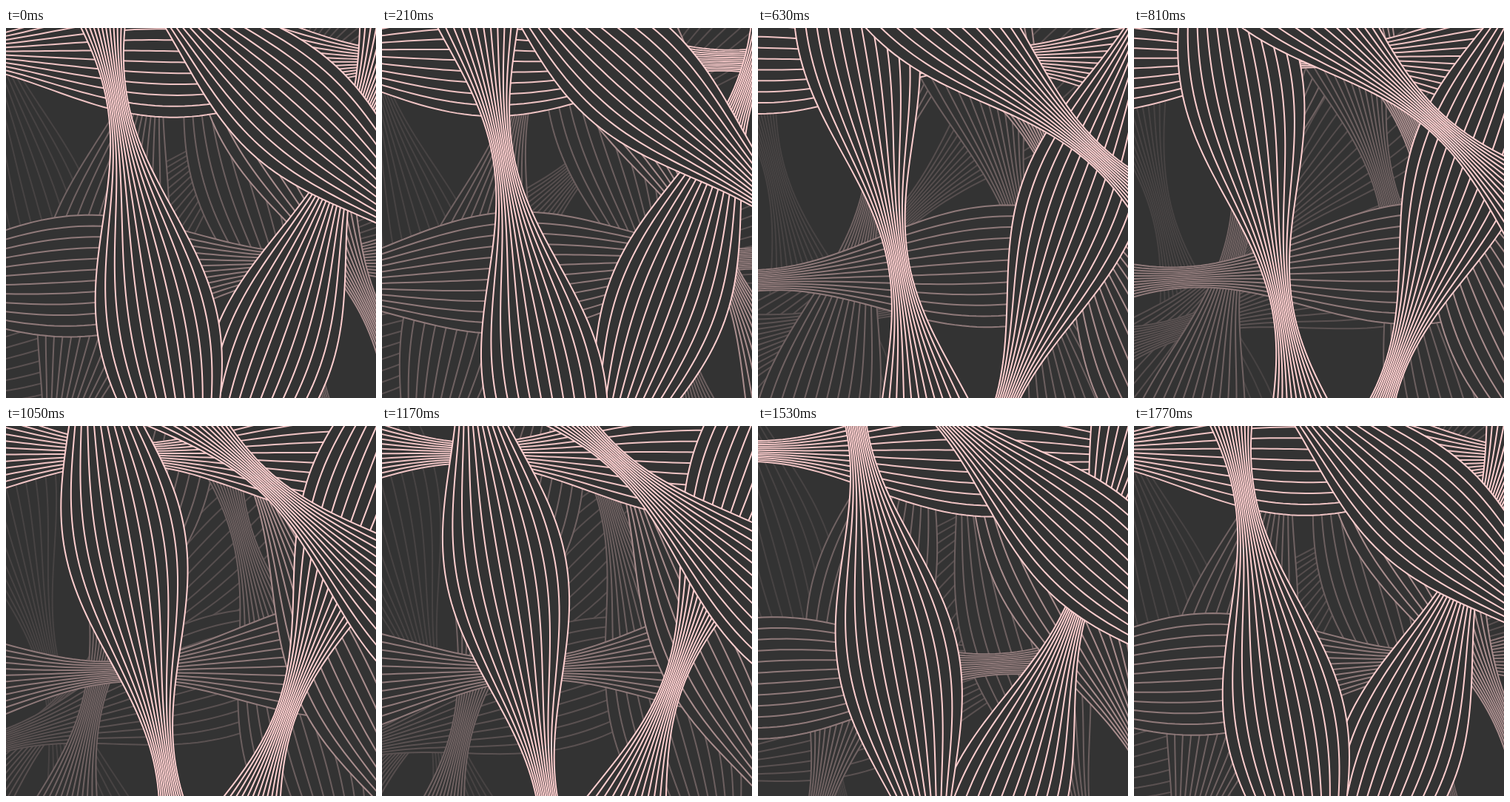
Recreate the animation shown at these times as an HTML page with a canvas. Size 500 by 500 pixels, loop 1800 ms.

```html
<!DOCTYPE html>
<html lang="en">
<head>
<meta charset="utf-8">
<title>Ribbons</title>
<style>
  html, body { margin: 0; width: 100%; height: 100%; overflow: hidden; background: #333; }
  canvas { display: block; }
</style>
</head>
<body>
<canvas id="stage" width="500" height="500"></canvas>
<script>
const ctx = document.getElementById('stage').getContext('2d');

const LOOP = 1800, STEP = 30;
const WAVE = 636;            // distance between two necks
const SPEED = WAVE / 59.5;   // travel per step
const MID = 48, SWELL = 34;  // half width: mean and swing
const STRANDS = 12;
const REACH = 900, GRAIN = 10;
const BACK = [51, 51, 51], PINK = [255, 207, 207];

// Back to front: a neck at time zero, heading in degrees, brightness
const ribbons = [
  { x: -37, y: -28, heading: 74.9, tone: 0.10 },
  { x: 343, y: 112, heading: 135, tone: 0.17 },
  { x: 342, y: 322, heading: 163.3, tone: 0.19 },
  { x: 208, y: 10, heading: 104, tone: 0.30 },
  { x: 421, y: 497, heading: 253.8, tone: 0.28 },
  { x: -218, y: 354, heading: -3.4, tone: 0.45 },
  { x: 496, y: 389, heading: 244.3, tone: 0.58 },
  { x: -97, y: 32, heading: 181.2, tone: 0.92 },
  { x: 469, y: 142, heading: -69.8, tone: 1 },
  { x: 150, y: 97, heading: 79.8, tone: 1 },
  { x: 625, y: 323, heading: 222, tone: 1 }
];

const shade = tone =>
  `rgb(${BACK.map((c, i) => Math.round(c + (PINK[i] - c) * tone)).join(',')})`;

function halfWidth(s, shift) {
  return MID - SWELL * Math.cos((s - shift) * 2 * Math.PI / WAVE);
}

// One strand along the ribbon; side runs from -1 to 1
function trace(side, shift, reverse) {
  for (let d = -REACH; d <= REACH; d += GRAIN) {
    const s = reverse ? -d : d;
    ctx.lineTo(s, side * halfWidth(s, shift));
  }
}

function drawRibbon({ x, y, heading, tone }, shift) {
  ctx.save();
  ctx.translate(x, y);
  ctx.rotate(heading * Math.PI / 180);

  ctx.beginPath();
  trace(-1, shift, false);
  trace(1, shift, true);
  ctx.fillStyle = shade(0);
  ctx.fill();

  ctx.strokeStyle = shade(tone);
  ctx.lineWidth = 2;
  for (let i = 0; i < STRANDS; i++) {
    ctx.beginPath();
    trace(2 * i / (STRANDS - 1) - 1, shift, false);
    ctx.stroke();
  }
  ctx.restore();
}

function draw() {
  const step = Math.floor(performance.now() % LOOP / STEP);
  ctx.fillStyle = shade(0);
  ctx.fillRect(0, 0, 500, 500);
  for (const ribbon of ribbons) drawRibbon(ribbon, step * SPEED);
  requestAnimationFrame(draw);
}
draw();
</script>
</body>
</html>
```
